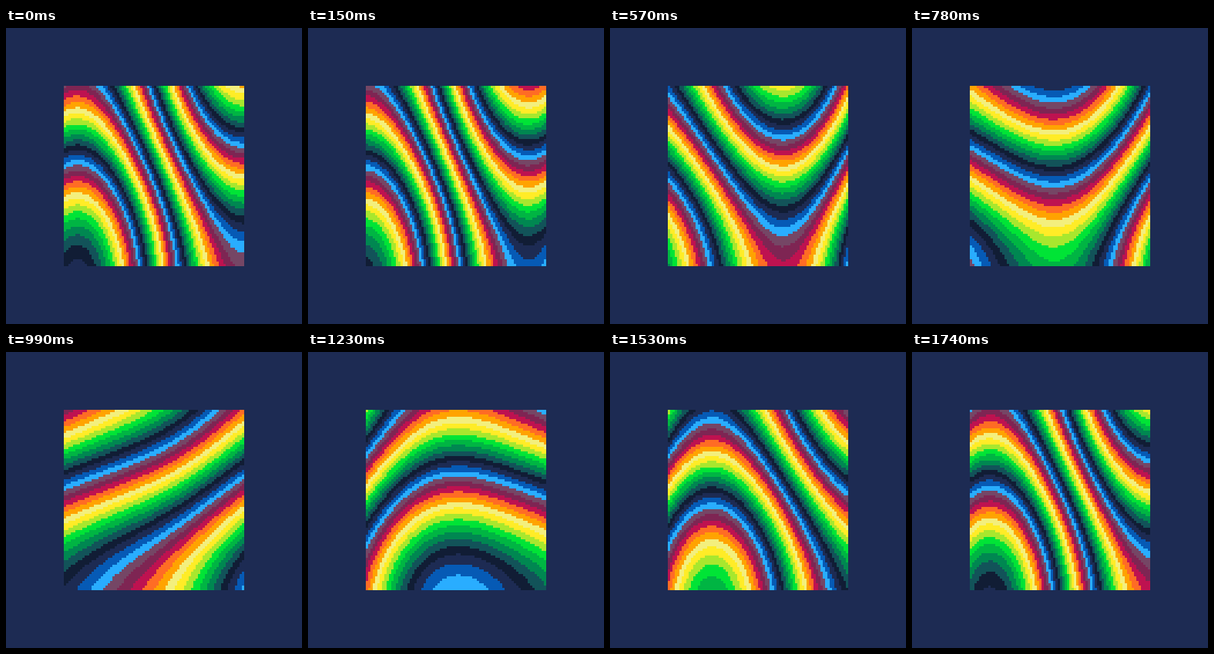
An HTML page with a canvas that plays this animation: 384x384 px, repeating every 1770 ms.

```html
<!DOCTYPE html>
<html lang="en">
<head>
<meta charset="utf-8">
<title>Plasma</title>
<style>
  html, body { margin: 0; width: 100%; height: 100%; overflow: hidden; background: #1d2b53; }
  canvas { display: block; width: 100vw; height: 100vh; image-rendering: pixelated; }
</style>
</head>
<body>
<canvas id="stage" width="384" height="384"></canvas>
<script>
  const ctx = document.getElementById('stage').getContext('2d');
  const palette = [
    '#1d2b53', '#065ab5', '#29adff', '#754665', '#7e2553', '#be1250', '#ff6c24', '#ffa300',
    '#f3ef7d', '#ffec27', '#a8e72e', '#00e436', '#00b543', '#008751', '#125359', '#111d35'
  ];
  const CELL = 3, COUNT = 78, ORIGIN = 75;
  const STEP = 30, STEPS = 59;
  const cos = deg => Math.cos(deg * Math.PI / 180);
  const sin = deg => Math.sin(deg * Math.PI / 180);

  const centres = Array.from({ length: COUNT }, (_, i) => ORIGIN + (i + 0.5) * CELL);
  const still = centres.map(x => -19.05 + 7.8 * cos(x - 91));
  const rise = centres.map(y => 10.8 + 17.3 * sin(0.5 * (y - 155)));

  // A wave travelling left over two fixed waves, one per axis.
  function draw(step) {
    ctx.fillStyle = palette[0];
    ctx.fillRect(0, 0, 384, 384);
    centres.forEach((x, i) => {
      const column = still[i] + 16 * cos(step * 6 + 70 + 0.73 * (x - 190));
      rise.forEach((lift, j) => {
        ctx.fillStyle = palette[Math.floor(column + lift) & 15];
        ctx.fillRect(ORIGIN + i * CELL, ORIGIN + j * CELL, CELL, CELL);
      });
    });
  }

  let shown = -1;
  function tick() {
    const step = Math.floor(performance.now() / STEP) % STEPS;
    if (step !== shown) draw(shown = step);
    requestAnimationFrame(tick);
  }
  tick();
</script>
</body>
</html>
```
